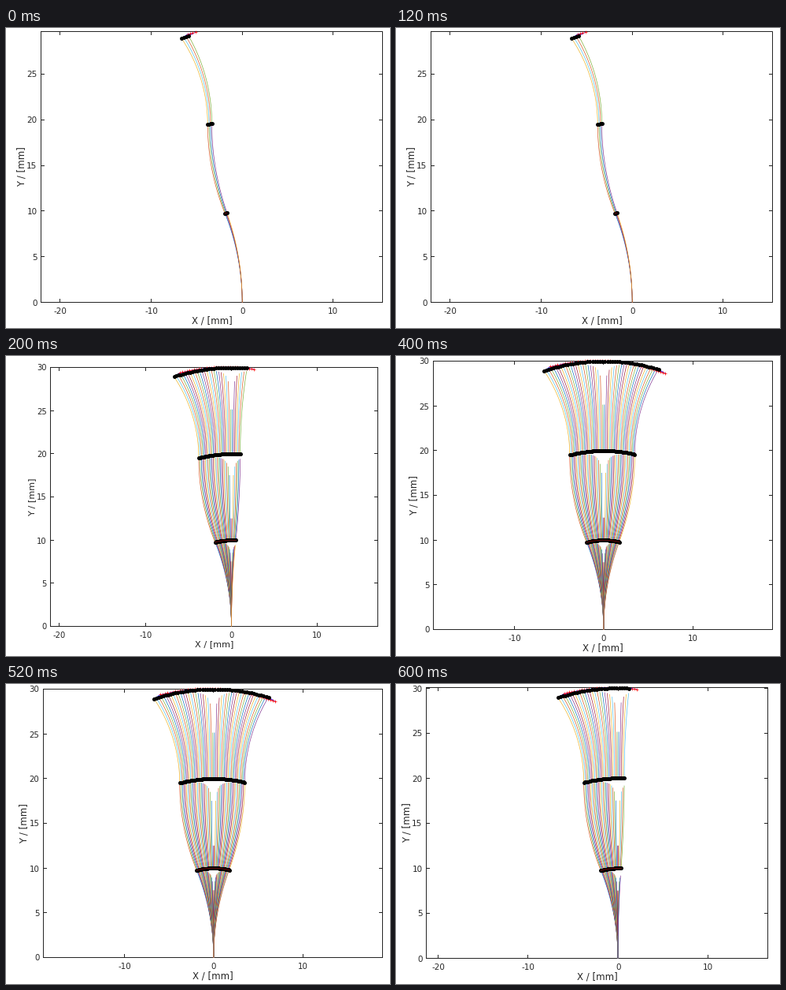
A matplotlib script that plays this animation: 488x380 px, repeating every 800 ms.

```python
import math

import matplotlib.pyplot as plt
import numpy as np
from matplotlib.animation import FuncAnimation

W, H, DPI = 488, 380, 100
PX = 72 / DPI
INK = "#262626"
PALETTE = ["#0072bd", "#d95319", "#edb120", "#7e2f8e",
           "#77ac30", "#4dbeee", "#a2142f"]

SEGMENT = 10.0        # mm
BEND_STEP = math.pi / 200
FIRST_BEND = 24.5 * BEND_STEP
TIP_RATIO = 1.54
ARC_GAP = 0.0059      # rad left undrawn at the end of each arc
LEAD = 0.85           # mm from tip to its target
FULL_WIDTH = 434      # box width at which text has its nominal size

# left, right, top, bottom, x of zero, pixels per mm, number of poses
VIEWS = [
    (44.5, 478.5, 4.5, 347.5, 300.2, 11.56, 4),
    (56.5, 472.5, 14.5, 342.5, 286.5, 10.93, 32),
    (47.5, 478.5, 6.5, 346.5, 263.8, 11.33, 48),
    (38.5, 472.5, 4.5, 347.5, 282.0, 11.41, 30),
]

plt.rcParams["font.family"] = "DejaVu Sans"
fig = plt.figure(figsize=(W / DPI, H / DPI), dpi=DPI, facecolor="white")
ax = fig.add_axes([0, 0, 1, 1])


def arc(start, heading, bend, t):
    """Point(s) on a constant-curvature segment at fraction t."""
    end = heading + bend * t
    x = start[0] - SEGMENT * (math.cos(heading) - np.cos(end)) / bend
    y = start[1] + SEGMENT * (np.sin(end) - math.sin(heading)) / bend
    return x, y


def line(x, y, color, width=0.65, **style):
    ax.plot(x, y, color=color, lw=width * PX, snap=False, **style)


def label(x, y, text, size, **style):
    ax.text(x, y, text, fontsize=size * PX, color=INK, **style)


def multiples(step, low, high):
    first = math.ceil(low / step - 0.01)
    last = math.floor(high / step + 0.01)
    return [step * k for k in range(first, last + 1)]


def draw_box(left, right, top, bottom, zero, scale):
    zoom = (right - left) / FULL_WIDTH
    small, large = 10.4 * zoom, 11.8 * zoom
    line([left, right, right, left, left], [top, top, bottom, bottom, top],
         INK, 1, zorder=1, solid_joinstyle="miter")
    for value in multiples(10, (left - zero) / scale, (right - zero) / scale):
        x = math.floor(zero + value * scale) + 0.5
        line([x, x], [bottom, bottom - 4], INK, 1)
        line([x, x], [top, top + 4], INK, 1)
        label(x, bottom + 10.7 * zoom, str(value), small, ha="center",
              va="center_baseline")
    for value in multiples(5, 0, (bottom - top) / scale):
        y = math.floor(bottom - value * scale) + 0.5
        line([left, left + 4], [y, y], INK, 1)
        line([right, right - 4], [y, y], INK, 1)
        label(left - 5, y, str(value), small, ha="right",
              va="center_baseline")
    label((left + right) / 2, bottom + 23.5 * zoom, "X / [mm]", large,
          ha="center", va="center")
    label(left - 24.5 * zoom, (top + bottom) / 2, "Y / [mm]", large,
          ha="center", va="center", rotation=90)


def draw_arms(count, to_px):
    joints, targets = [], []
    for pose in range(count):
        bend = FIRST_BEND - BEND_STEP * pose
        point, heading = (0.0, 0.0), 0.0
        chain = []
        for k, turn in enumerate((bend, -bend, TIP_RATIO * bend)):
            # The gap is an angle, so nearly straight arcs stop well short.
            reach = 1 - ARC_GAP / abs(turn)
            curve = arc(point, heading, turn, np.linspace(0, reach, 30))
            line(*to_px(*curve), PALETTE[(3 * pose + k) % 7], zorder=2)
            point = arc(point, heading, turn, 1)
            heading += turn
            chain.append(point)
        target = (point[0] + LEAD * math.cos(heading),
                  point[1] + LEAD * math.sin(heading))
        line(*to_px(*np.array([point, target]).T), "blue", 0.6, zorder=3)
        joints.append(chain)
        targets.append(target)

    line(*to_px(*np.array(targets).T), "red", ls="", marker="+",
         ms=5 * PX, mew=0.7 * PX, zorder=4)
    joints = np.array(joints)
    line(*to_px(*joints.reshape(-1, 2).T), "black", ls="", marker="o",
         ms=5 * PX, mew=0, zorder=5)
    line(*to_px(*joints[:, 0].T), "#c01010", 0.9, alpha=0.6, zorder=6)


def draw(frame):
    ax.clear()
    ax.set(xlim=(0, W), ylim=(H, 0))
    ax.axis("off")
    *box, count = VIEWS[frame]
    _, _, _, bottom, zero, scale = box

    def to_px(x, y):
        return zero + x * scale, bottom - y * scale

    draw_box(*box)
    draw_arms(count, to_px)
    return []


anim = FuncAnimation(fig, draw, frames=len(VIEWS), init_func=lambda: [],
                     interval=200, repeat=True)
plt.show()
```
